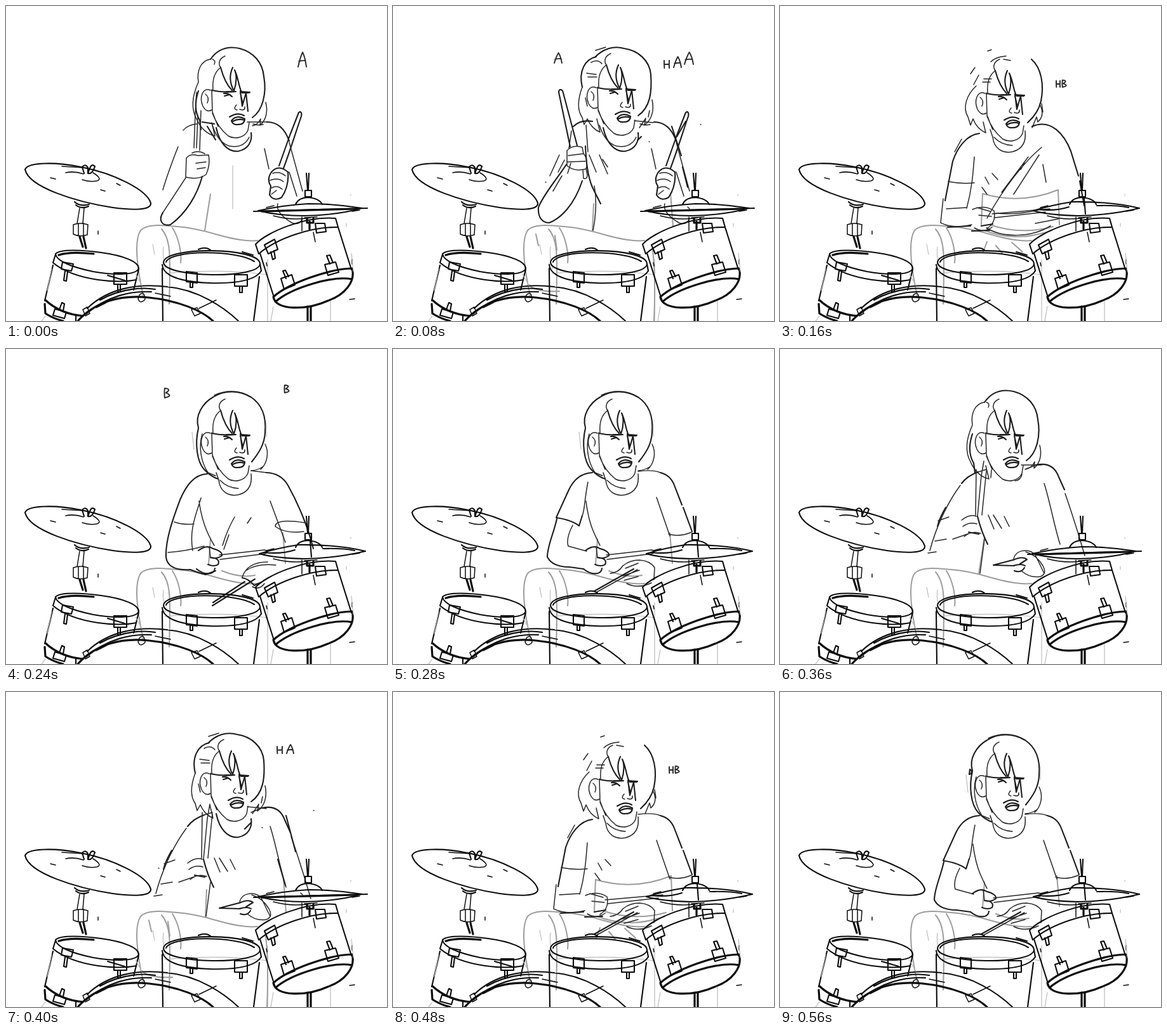
An HTML page for the animation above (600 ms loop, 600 px wide and 497 px high).

```html
<!DOCTYPE html>
<html lang="en">
<head>
<meta charset="utf-8">
<title>Drummer</title>
<style>
  html, body { margin: 0; width: 100%; height: 100%; overflow: hidden; background: #fff; }
  svg { display: block; width: 100vw; height: 100vh; }
  path { fill: none; stroke: #262626; stroke-width: 1.5; stroke-linecap: round; stroke-linejoin: round; }
  path.mid { stroke: #1c1c1c; stroke-width: 2.1; }
  path.grey { stroke: #9c9c9c; stroke-width: 2; }
  path.pale { stroke: #bbb; stroke-width: 1.2; }
  .kit path { stroke: #0c0c0c; stroke-width: 2.1; }
  .kit .thin { stroke-width: 1.5; }
  .kit .bold { stroke-width: 3.2; }
  #letters path { stroke-width: 1.9; }
</style>
</head>
<body>
<svg viewBox="0 0 600 497">
  <!-- legs -->
  <path class="grey" d="M216 457C208 420 200 372 212 354C222 343 248 346 270 348C295 350 313 355 330 360C358 368 380 372 396 370M245 352C260 368 259 395 257 470M262 350C272 365 277 390 275 405"/>
  <path class="pale" d="M250 422Q340 414 412 424M412 400V497M511 465V497M231 376L234 392M248 380Q246 395 251 415"/>
  <path class="grey" data-on="0 5 6" d="M322 297L313 354"/>
  <path class="grey" data-on="1 7" d="M437 295L441 348M225 360L229 378M255 362L258 385M316 312L314 354M409 385Q414 430 411 497M214 440Q226 452 262 450"/>
  <path class="grey" data-on="2 8" d="M317 345L319 296Q380 314 438 290L440 345M322 354Q372 374 428 354M330 345Q380 362 430 348M320 388L326 372M365 373L382 388M340 378L350 390"/>
  <path class="grey" data-on="3 4 9" d="M322 300L319 340M436 290L440 338M340 350Q370 362 392 357"/>

  <!-- hair -->
  <g data-on="0 5 6">
    <path class="mid" d="M322 84C334 67 351 63 368 67C390 73 404 89 406 111C411 138 404 165 388 176M303 134C296 155 299 170 305 180L307 195"/>
    <path d="M322 84C307 86 300 102 303 120C294 140 290 160 300 178C305 190 315 202 329 205L324 184M325 84Q331 86 328 92M409 152C413 167 409 181 400 188L401 178Q396 188 388 189M380 183H412"/>
  </g>
  <g data-on="1 7">
    <path class="mid" d="M318 81C330 68 347 62 364 67C386 70 404 86 406 108C408 136 405 160 386 173M320 80C302 84 292 103 298 128"/>
    <path d="M298 128C290 150 291 166 298 176L301 187L306 178C310 188 318 196 326 199L321 178M305 106L320 108M307 112H321M312 89Q322 83 329 91M319 70L335 65M408 148C412 165 407 180 396 188L398 177L388 192M380 181L410 184M402 175L404 165M303 145L306 158"/>
  </g>
  <g data-on="2 8">
    <path class="mid" d="M396 84C412 98 416 125 411 150C408 164 401 174 390 184"/>
    <path d="M321 115H333M319 120H331M309 126C294 140 287 160 296 175L300 188L304 178Q310 194 324 200L320 183M409 155Q418 172 406 183L404 175L397 192M300 107L307 97M332 88Q340 80 356 79M327 71L333 69M352 84L363 86M412 154L414 167M305 124L313 109"/>
  </g>
  <g data-on="3 4 9">
    <path class="mid" d="M303 124C297 105 310 85 326 76C344 64 368 65 386 76C404 88 410 108 408 132C407 150 399 163 387 178M303 125C297 150 301 178 312 190Q322 201 334 205"/>
    <path d="M309 134C303 155 307 178 318 195L330 200M408 150C415 164 411 181 401 190M386 192Q397 191 404 186M328 73Q350 63 374 70"/>
    <path class="pale" d="M293 131L296 158M410 117V138"/>
  </g>
  <path data-on="9" class="mid" d="M299 122Q303 123 301 129L298 130Z"/>

  <!-- face -->
  <g id="face">
    <path d="M345 79C337 82 333 90 338 97C327 105 325 119 326 132M322 133C310 127 304 144 310 158Q316 169 324 164M314 139Q321 144 317 153M363 156Q357 163 364 164M368 163Q377 166 376 159"/>
    <path class="mid" d="M338 97C342 112 348 125 356 133M357 97C351 110 353 123 359 134C364 120 363 107 360 101C366 113 366 126 371 136M369 134L372 158L378 137L381 166M369 137L373 155"/>
    <path class="mid" d="M324 133Q342 137 362 135M347 135H362M370 135L384 136M372 137H383M343 138Q350 137 356 143M344 142L351 140"/>
    <path d="M324 132L325 167Q329 178 334 190M325 169C331 185 340 197 350 205C360 211 376 208 381 196L383 184"/>
    <path id="mouth" class="mid" d="M355 181Q363 171 376 178Q376 187 365 187Q357 188 355 181M357 182Q366 177 375 180M352 175Q365 167 375 173"/>
  </g>

  <!-- collar -->
  <path data-on="0 1 7" class="mid" d="M331 192C336 216 349 231 366 229C382 226 388 213 386 200"/>
  <path data-on="0 1" d="M325 188Q334 216 352 221Q374 225 383 207"/>
  <path data-on="2 3 4 8 9" d="M331 195L335 207C337 225 350 233 366 230C382 226 388 215 386 197M337 207Q348 219 366 220"/>
  <path data-on="5 6" d="M333 191L332 203M381 198Q379 207 370 208"/>

  <!-- arm on the left -->
  <g data-on="0">
    <path class="mid" d="M247 326C239 339 247 348 259 345M309 269C301 298 284 327 259 345M309 183L328 186M317 190L330 211"/>
    <path d="M301 186Q287 187 279 196M271 222C262 245 254 266 247 290M283 271L247 326M300 136L298 170L296 224M307 165L305 228M302 174L300 224M283 270L284 240Q290 232 302 236L319 235Q322 251 315 266Q302 275 283 270M293 232Q303 227 313 233M299 248L315 246M301 257L314 255"/>
    <path class="pale" d="M357 252V320"/>
  </g>
  <g data-on="1">
    <path class="mid" d="M261 136C261 130 267 131 268 137L290 220M261 136L279 222M273 250C259 272 235 300 229 318C228 335 236 342 246 342C264 335 285 315 298 276M303 221C304 245 307 270 314 286L327 312M314 182Q295 179 284 190"/>
    <path d="M274 228Q284 218 298 223L300 233Q308 242 304 257Q286 262 274 252ZM276 236L300 233M275 246L303 245M299 258L300 272Q306 274 306 266L304 257M262 235L247 268M270 243L260 262M281 197L277 225M304 188L307 230M317 284C322 310 318 340 315 354M325 235L338 265M309 235L320 262M330 242L338 254M252 292L266 268M280 248L275 264"/>
  </g>
  <g data-on="2 8">
    <path class="mid" d="M314 201C294 203 279 224 272 245L260 307M264 349L300 347M302 355L330 354M317 347L335 344"/>
    <path d="M306 238C304 265 302 290 294 319M265 277Q285 281 306 279M257 304L253 342Q272 352 302 345M262 320L294 318M303 321Q322 313 337 323Q341 342 326 351M310 318L331 324M313 330L333 332M334 328L425 320M338 334L418 325M275 230L286 210M323 270L329 281M334 264L343 274M318 286L326 297M306 350Q320 359 334 349"/>
  </g>
  <g data-on="3">
    <path class="mid" d="M317 197C296 198 284 215 274 238C264 265 251 300 252 328C254 347 273 349 290 348Q302 353 314 356L330 350"/>
    <path d="M307 235C300 260 288 284 294 318M304 240C308 270 316 290 328 310M265 273Q280 278 296 276M255 321Q284 319 312 311M360 265Q348 286 341 310M386 266L380 275M351 293L343 316"/>
  </g>
  <g data-on="4 9">
    <path class="mid" d="M314 195C296 196 284 207 277 222L257 266C275 269 287 274 293 279L298 263M258 268C253 291 243 311 243 328Q251 344 278 344L300 347"/>
    <path d="M307 210C301 240 302 255 298 263M304 240C308 275 316 290 326 310M283 278Q272 299 276 311L305 319"/>
  </g>
  <g data-on="3 4 9">
    <path class="mid" d="M303 318Q316 308 326 315Q341 319 340 326Q332 332 322 329M324 329Q338 331 334 340Q328 344 318 340M300 347C312 357 328 357 329 346"/>
    <path d="M320 312L322 329M336 325L407 317Q415 319 408 323L337 332"/>
  </g>
  <g data-on="5">
    <path class="mid" d="M310 198Q286 203 276 222C266 250 255 285 248 323M330 316L404 292Q414 291 408 298L334 321"/>
    <path d="M333 193Q320 193 310 198M305 235C299 260 286 280 282 307M248 324Q250 337 270 341Q295 341 304 346L325 342M261 326C284 326 294 316 311 307Q326 301 334 315Q337 328 322 330M314 310L331 312M313 319L333 320M318 327L329 326M251 331L270 323M256 337L280 334M305 334L326 338"/>
  </g>
  <g data-on="6 7">
    <path class="mid" d="M312 194Q295 200 286 212M311 264Q317 288 327 308M297 289L313 292M261 250Q251 267 248 280"/>
    <path d="M325 190L312 194M284 215C264 242 246 280 236 318M321 177L317 200L311 264M309 190L308 262M325 192L318 262M286 270Q299 260 309 264M288 280Q298 272 310 276M290 296Q302 286 316 291M244 303L262 300M272 300L298 291M233 322L246 320M328 262L337 284M336 262L349 283M353 264L361 280M249 271L266 265M322 300L315 354"/>
  </g>

  <!-- arm on the right -->
  <g data-on="0 1">
    <path class="mid" d="M461 168C465 165 466 170 465 174C456 200 447 230 437 256M461 168L447 204L430 252M418 262Q429 249 444 262Q446 284 434 302Q422 309 415 298L417 284Q410 274 418 262M411 183C430 183 440 196 446 213"/>
    <path d="M420 264Q431 260 440 268M416 275Q428 270 437 277M418 287Q427 282 435 289M418 297L426 291M446 215L467 292M407 225L414 257M446 262L458 300M428 312Q424 326 450 342Q462 347 467 335M405 187Q397 189 389 186"/>
  </g>
  <path data-on="1" class="mid" d="M439 190L454 236M456 254L464 286M391 206L385 212M447 206L461 182"/>
  <g data-on="2">
    <path class="mid" d="M397 190C427 177 448 203 458 229L470 268M472 276L479 315"/>
    <path d="M412 223C385 245 350 290 326 335M408 235L368 297M391 238L349 294M414 250L419 278M385 248L379 258M325 350C350 366 395 366 426 347M340 327Q372 330 406 322M402 343L438 336"/>
  </g>
  <g data-on="3">
    <path class="mid" d="M410 195Q433 196 444 215C458 240 475 278 484 315M326 400L376 367M325 405L392 363M372 361Q381 362 391 373L402 368"/>
    <path d="M386 192L410 195M416 240L440 305M470 274Q424 267 424 280Q440 292 469 288M372 360Q380 336 412 336M379 349Q395 338 425 341M388 375Q399 381 407 370"/>
  </g>
  <g data-on="4 8 9">
    <path class="mid" d="M421 195Q437 199 443 215L455 246M457 250L471 288M317 382L379 347"/>
    <path d="M386 193Q409 190 421 195M415 234L436 295M434 292Q452 297 470 289M320 384L385 348M342 354Q355 353 362 342Q373 333 388 333Q405 334 412 345L411 364M366 346L386 338M362 358L388 349M364 365L386 359M368 370Q386 379 407 369"/>
  </g>
  <g data-on="5 6 7">
    <path class="mid" d="M336 341L370 332M336 341L369 342M403 183Q430 177 439 202L448 222M367 333Q382 326 389 332L378 339M367 342Q380 338 386 342M369 350Q380 354 385 345"/>
    <path d="M386 190L403 183M449 228Q465 274 480 326M416 212C425 240 432 280 441 308M368 331C371 317 389 315 399 322M387 320Q404 325 414 342Q421 355 410 359Q394 362 380 350M402 325L416 354"/>
  </g>
  <path data-on="7" class="mid" d="M441 195L456 252M428 264L440 305M386 206L376 216"/>

  <!-- drum kit -->
  <g class="kit">
    <path d="M30 258C34 246 80 246 118 254C170 264 222 290 228 311C229 323 198 322 168 318C110 309 36 286 30 258Z"/>
    <path class="thin" d="M88 253L122 255M94 263Q107 260 122 265M137 263Q153 273 143 276Q131 278 120 274M70 271L78 273M174 280L180 283M149 290L156 292"/>
    <path d="M123 264L120 254Q125 248 129 255V264Q136 266 140 253Q135 248 132 256L129 264M108 309Q116 317 131 313M110 314Q119 321 130 316"/>
    <path class="thin" d="M116 319L112 343M123 319L121 343M106 345Q117 341 129 345L128 361Q116 365 106 360ZM114 343V362M122 343V362M145 355V360"/>
    <path class="bold" d="M116 364L121 380M122 364L126 382"/>

    <path d="M78 391C86 383 122 385 150 389C187 394 209 404 209 414C205 426 165 424 137 419C103 412 79 402 78 391ZM78 392L74 405Q98 425 145 432Q181 437 205 432L209 415"/>
    <path d="M74 409L61 465M205 432L201 448M89 404L106 407L103 418L87 415ZM170 421H190V439H170ZM93 418L91 433L95 434L97 419M176 440V451H180V440"/>
    <path class="bold" d="M83 393Q100 387 138 391M62 464Q86 486 121 489M61 470L62 485Q74 493 90 497"/>
    <path d="M77 478L95 483L92 493L74 488ZM84 479L88 468L92 470L90 481M110 488V497M160 425L187 433"/>

    <path class="bold" d="M113 497C141 466 181 455 225 460C273 465 309 481 326 497"/>
    <path class="mid" d="M128 477C160 446 206 437 254 443C302 447 344 476 366 497M126 486C160 457 198 449 229 451M148 464C183 444 219 444 235 447"/>
    <path class="thin" d="M210 456Q218 448 219 463Q211 471 208 462ZM121 479L128 475L132 485L125 489ZM292 479L301 476L306 485L297 489ZM304 477L331 464M142 476L158 468M235 453L259 458"/>

    <path d="M248 405C248 379 400 380 400 407C398 431 251 429 248 405ZM246 408Q248 434 320 437Q389 439 402 418L400 407M252 404C258 385 362 384 391 403"/>
    <path d="M246 414L247 497M399 427L390 497M284 419L301 421V437L284 435ZM360 424H380V442H360ZM290 437V444H294V437M368 442V452H372V442M303 384Q314 379 322 385M372 388L389 393"/>

    <path class="mid" d="M393 376C410 357 471 331 519 335L523 349C482 348 427 366 398 391ZM400 390L424 466M523 349L544 416"/>
    <path class="bold" d="M421 459C444 438 507 415 545 414C551 435 533 456 507 465C474 480 424 481 421 459ZM425 466C451 444 515 425 545 431"/>
    <path d="M407 377L423 368L428 384L413 391ZM417 388L420 400L424 398L422 386M487 343H502L504 356L489 358ZM433 430L450 424L455 440L438 447ZM441 430L436 418L440 417L445 427M502 408L519 404L524 420L507 425ZM510 407L505 394L510 393L515 405"/>
    <path class="thin" d="M410 405L411 410M484 357L487 372M541 463L549 462M545 400V407"/>
    <path class="bold" d="M475 474V497M480 474V497M474 335V342H484V335M478 340V352"/>

    <path d="M473 264L475 290M477 264L476 290M471 291H481V301H471ZM456 313Q461 302 476 302Q494 304 498 313"/>
    <path data-on="0 1 5 6 7" d="M397 323Q438 314 476 312Q518 312 561 319Q521 330 470 331Q430 331 397 323M390 324L569 319"/>
    <path class="bold" data-on="0 1 5 6 7" d="M403 324L552 320"/>
    <path data-on="2 3 4 8 9" d="M399 323Q428 314 460 309Q520 308 566 319Q520 330 470 331Q424 330 399 323M406 321Q434 324 455 317M499 315Q530 314 549 318M479 303L481 328"/>
    <path class="thin" d="M421 331Q450 339 480 334M410 318L422 315M545 324L557 322M466 333V355M470 334L490 333"/>
  </g>
  <path class="pale" d="M72 414L65 449M204 423L214 441M56 497L62 489M421 474L417 497M536 343V348M543 297V299M544 390L547 419"/>
  <path data-on="1 7" d="M484 187h1M464 317l3 3M403 214h1M240 278h1"/>
  <g id="letters"></g>
</svg>
<script>
const starts = [0, 80, 160, 240, 280, 320, 360, 400, 480, 560];
const loop = 600;
const glyphs = {
  A: [[0, 1, 0.25, 0.35, 0.55, 0], [0.55, 0, 0.85, 0.35, 1, 1], [0.1, 0.62, 0.5, 0.55, 0.9, 0.58]],
  H: [[0, 0, 0, 0.5, 0.05, 1], [1, 0, 0.95, 0.5, 1, 1], [0, 0.52, 0.5, 0.5, 1, 0.48]],
  B: [[0.1, 0, 0, 0.5, 0.1, 1], [0.1, 0, 1.4, 0.05, 0.3, 0.48], [0.3, 0.48, 1.7, 0.8, 0.1, 1]]
};
const letters = document.getElementById('letters');

function letter(poses, char, x, y, w, h) {
  const path = document.createElementNS('http://www.w3.org/2000/svg', 'path');
  path.setAttribute('d', glyphs[char].map(([a, b, c, d, e, f]) =>
    `M${x + a * w} ${y + b * h}Q${x + c * w} ${y + d * h} ${x + e * w} ${y + f * h}`).join(''));
  path.dataset.on = poses;
  letters.append(path);
}

letter('0', 'A', 460, 73, 13, 23);
letter('1', 'A', 254, 74, 12, 16);
letter('1', 'H', 427, 86, 8, 12);
letter('1', 'A', 442, 80, 12, 17);
letter('1', 'A', 459, 73, 14, 19);
letter('2 8', 'H', 435, 118, 6, 10);
letter('2 8', 'B', 444, 117, 7, 11);
letter('3', 'B', 249, 62, 9, 15);
letter('3', 'B', 438, 57, 8, 12);
letter('7', 'H', 427, 86, 8, 11);
letter('7', 'A', 442, 83, 11, 14);

const layers = [...document.querySelectorAll('[data-on]')]
  .map(el => ({ el, poses: el.dataset.on.split(' ').map(Number) }));
const face = document.getElementById('face');
const mouth = document.getElementById('mouth');
const faceShift = { 1: [-2, -4], 7: [-2, -4], 2: [1, 5], 8: [1, 5] };
let shown = -1;

function draw(now) {
  const t = now % loop;
  const pose = starts.filter(s => s <= t).length - 1;
  if (pose !== shown) {
    shown = pose;
    for (const { el, poses } of layers) el.style.display = poses.includes(pose) ? '' : 'none';
    face.setAttribute('transform', `translate(${faceShift[pose] || [0, 0]})`);
    mouth.style.display = pose === 5 ? 'none' : '';
  }
  requestAnimationFrame(draw);
}
draw(performance.now());
</script>
</body>
</html>
```
